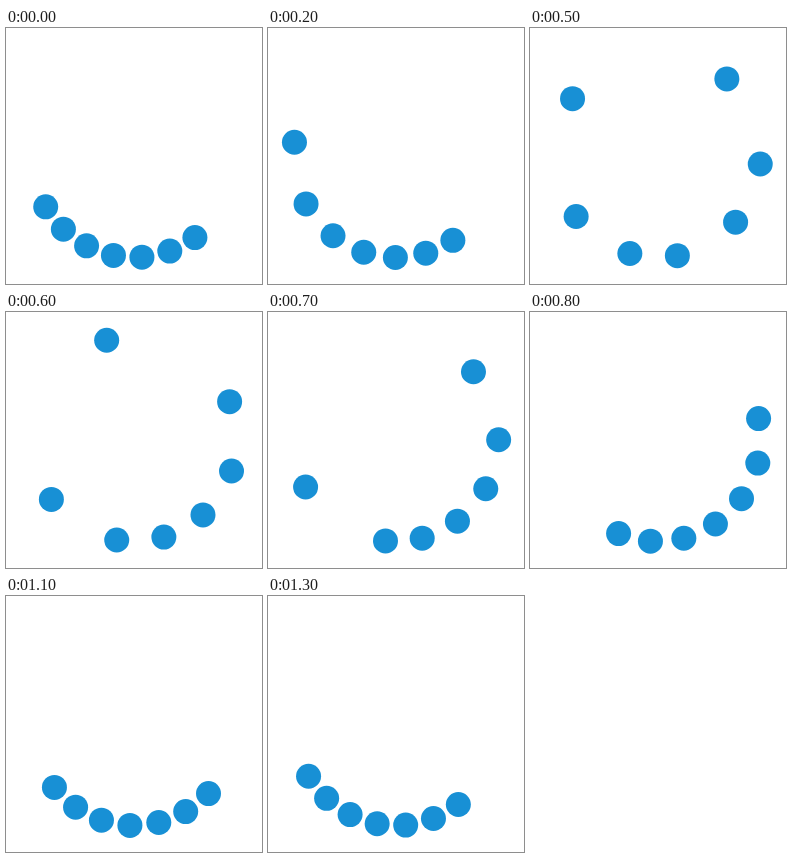
An HTML page for the animation above (1.35 s loop, 256 by 256 pixels).

```html
<!DOCTYPE html>
<html lang="en">
<head>
<meta charset="utf-8">
<title>Loading dots</title>
<style>
  html, body { margin: 0; width: 100%; height: 100%; overflow: hidden; background: #fff; }
  svg { display: block; width: 100vw; height: 100vh; }
</style>
</head>
<body>
<svg id="stage" viewBox="0 0 256 256" fill="#1890d5"></svg>
<script>
const LOOP = 1350, STEP = 50, COUNT = 7;
const CX = 128.15, CY = 127, ORBIT = 102.5, DOT = 12.5;

const stage = document.getElementById('stage');
const dots = Array.from({ length: COUNT }, () => {
  const dot = document.createElementNS('http://www.w3.org/2000/svg', 'circle');
  dot.setAttribute('r', DOT);
  return stage.appendChild(dot);
});

const bezier = (a, b, s) => 3 * (1 - s) * s * ((1 - s) * a + s * b) + s ** 3;

function ease(x, x1, y1, x2, y2) {
  let lo = 0, hi = 1;
  for (let i = 0; i < 30; i++) {
    const mid = (lo + hi) / 2;
    if (bezier(x1, x2, mid) < x) lo = mid; else hi = mid;
  }
  return bezier(y1, y2, lo);
}

// Every dot makes one clockwise turn; later dots hold back longer.
function draw(ms) {
  const time = (ms % LOOP) / LOOP;
  dots.forEach((dot, k) => {
    const turn = ease(time, 0.353 + 0.114 * k, 0, 0.018 + 0.007 * k, 0.943);
    const angle = (59.65 - 16 * k + 360 * turn) * Math.PI / 180;
    dot.setAttribute('cx', (CX - ORBIT * Math.sin(angle)).toFixed(2));
    dot.setAttribute('cy', (CY + ORBIT * Math.cos(angle)).toFixed(2));
  });
}

let start;
function tick(now) {
  start ??= now;
  // Twenty pictures a second, with a little slack for timer jitter.
  draw(Math.floor((now - start + 6) / STEP) * STEP);
  requestAnimationFrame(tick);
}
draw(0);
requestAnimationFrame(tick);
</script>
</body>
</html>
```
